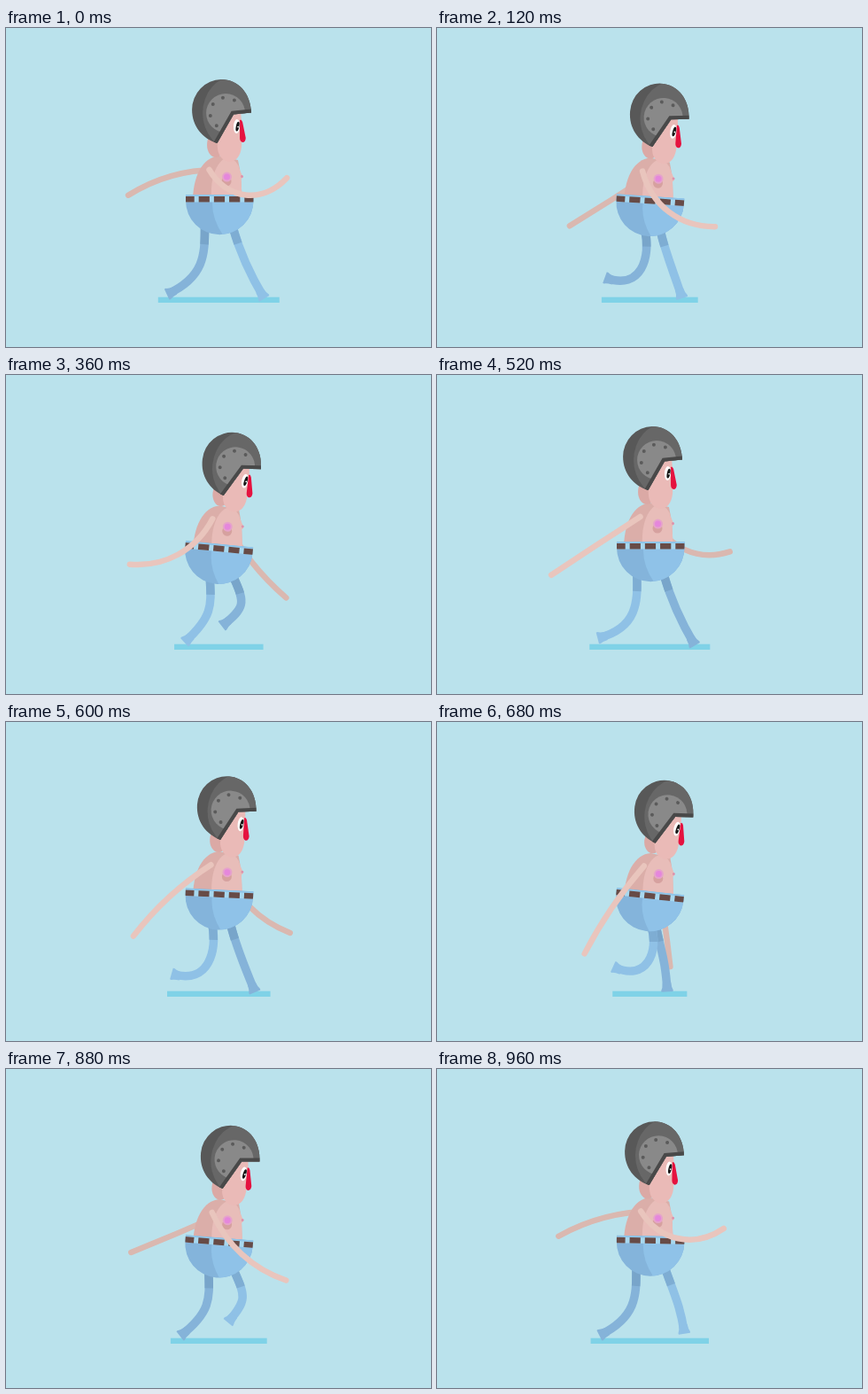
These frames come from a looping animation (480x360 px, 1 s). An HTML page with a canvas:

```html
<!DOCTYPE html>
<html lang="en">
<head>
<meta charset="utf-8">
<title>Walk cycle</title>
<style>
html, body { margin: 0; height: 100%; overflow: hidden; background: #bae2ec; }
canvas { display: block; }
</style>
</head>
<body>
<canvas id="stage" width="480" height="360"></canvas>
<script>
const c = document.getElementById('stage').getContext('2d');
const LOOP = 1000, STEP = 40, { sin, cos, PI } = Math;
const rad = deg => deg * PI / 180;

// Mean plus two harmonics of the walk angle
const wave = (a, mean, c1, s1, c2, s2) =>
  mean + c1 * cos(a) + s1 * sin(a) + c2 * cos(2 * a) + s2 * sin(2 * a);

// Point at a distance from p; 0 degrees hangs down, positive swings forward
const reach = ([x, y], length, deg) =>
  [x + length * sin(rad(deg)), y + length * cos(rad(deg))];

function fill(color, d) {
  c.fillStyle = color;
  c.fill(new Path2D(d));
}

function oval(color, x, y, rx, ry = rx, turn = 0) {
  c.fillStyle = color;
  c.beginPath();
  c.ellipse(x, y, rx, ry, turn, 0, 2 * PI);
  c.fill();
}

function rect(color, x, y, w, h) {
  c.fillStyle = color;
  c.fillRect(x, y, w, h);
}

function curve(color, width, from, p, q, to) {
  c.strokeStyle = color;
  c.lineWidth = width;
  c.beginPath();
  c.moveTo(...from);
  c.bezierCurveTo(...p, ...q, ...to);
  c.stroke();
}

// Run draw() moved by dx, dy and turned around px, py
function placed(dx, dy, deg, px, py, draw) {
  c.save();
  c.translate(px + dx, py + dy);
  c.rotate(rad(deg));
  c.translate(-px, -py);
  draw();
  c.restore();
}

function clipped(d, draw) {
  c.save();
  c.clip(new Path2D(d));
  draw();
  c.restore();
}

function arm(color, shoulder, length, swing, bend) {
  const p = reach(shoulder, length, swing);
  const q = reach(p, length, swing + bend / 2);
  c.lineCap = 'round';
  curve(color, 6.5, shoulder, p, q, reach(q, length, swing + bend));
}

// The foot slides back along the ground, then lifts and comes forward
function leg(color, shade, a, lean) {
  const k = cos(a), lift = Math.max(0, -sin(a));
  const hip = [240.5 + 16 * k + 9 * lift, 226 + 5 * lean];
  const foot = [237 + 54 * k - lift * (23 + 18 * k), 302 + 2 * k - 27 * lift];
  const shin = -17 + 48 * k - 85 * lift;
  const bones = [hip, reach(hip, 30, 8 + 8 * k + 15 * lift), reach(foot, 8 * k - 37, shin), foot];
  c.lineCap = 'butt';
  curve(color, 9.5, ...bones);
  c.setLineDash([18, 400]);
  curve(shade, 9.5, ...bones);
  c.setLineDash([]);
  placed(...foot, 90 - shin, 0, 0, () =>
    fill(color, 'M-9 -4.7Q-3 -5 0 -6.8L1.5 -6.5V6.5L0 6.8Q-3 5 -9 4.7Z'));
}

function torso() {
  fill('#dbaea9', 'M211 200C210 168 222 146 240 144.500L262 149Q267 170 266 200Z');
  fill('#e8bdb9', 'M233 200C229 172 237 150 250 146Q262 149 264 160L267 167Q268 169 265.500 171L267 200Z');
  oval('#d6a19f', 249, 173, 5.5);
  oval('#e6a3cb', 249.5, 168, 5.5);
  oval('#e587dc', 249.5, 168, 3.5);
  oval('#dd93ac', 266.5, 167.5, 1.5);
}

function pants() {
  clipped('M203 188H279.500V195A38.200 38.200 0 0 1 203 195Z', () => {
    rect('#84b4db', 200, 185, 84, 52);
    fill('#8fc2e8', 'M234 188Q229 215 250 240H290V188Z');
    rect('#8fc5e9', 200, 188, 84, 2);
    rect('#a8d8ef', 200, 190, 84, 6.5);
    for (let i = 0; i < 5; i++) rect('#674b47', 200.5 + i * 17.2, 190, 12.2, 6.5);
  });
}

function face() {
  oval('#dba9a5', 237, 132, 10, 14);
  fill('#eabab7', 'M239 128L254 94H265Q267 115 266 134Q264 151 251 151Q237 147 239 128Z');
}

function eyeAndNose() {
  oval('#fff', 260.5, 111, 3.6, 8, 0.05);
  oval('#161616', 261.5, 111, 1.8, 5.5, 0.2);
  oval('#fff', 262, 111.5, 0.9);
  fill('#e5123f', 'M264 104Q265.500 102 267 106L270.700 124Q270.500 129 267 129Q264 128 264 124Z');
}

function helmet() {
  clipped('M277 95.500L257 97.500L238.500 130C222 125 210 111 210 92A33.500 34 0 0 1 243 58C262 58 276 73 277 95.500Z', () => {
    rect('#585858', 205, 55, 75, 80);
    oval('#676767', 259, 96, 37, 42);
    oval('#898989', 248, 96, 22);
    for (let i = 0; i < 5; i++) {
      const a = rad(126 + 44.5 * i);
      oval('#5b5b5b', 248 + 17.5 * cos(a), 96 + 17.5 * sin(a), 2);
    }
    c.strokeStyle = '#494949';
    c.lineWidth = 8;
    c.stroke(new Path2D('M279 95.300L257 97.500L237 132.500'));
  });
}

function draw(t) {
  const a = t / LOOP * 2 * PI;
  // Lean: 0 with both feet apart, 1 when the legs pass
  const b = 2 * a - 0.126;
  const lean = (1 - cos(b)) / 2 + 0.06 * (1 - cos(2 * b));
  const half = 33 + 35.5 * Math.abs(cos(a)) ** 1.6;

  rect('#bae2ec', 0, 0, 480, 360);
  rect('#7fd2e7', 240.3 - half, 303.7, 2 * half, 6.3);
  arm('#dab8b0', [245 + 2 * lean, 160 + 4 * lean], 38,
    wave(a, -18, -58, 7, -16, 0), wave(a, 14, -26, 0, 46, 0));
  leg('#85b3d9', '#78a5ca', a + PI, lean);
  leg('#8fc1e6', '#7eadd3', a, lean);
  placed(0.5 * lean, 4 * lean, 1.5 * lean, 241, 190, torso);
  placed(-0.7 * lean, 3.5 * lean, 7.3 * lean, 241, 192, pants);
  placed(6 * lean, 4.5 * lean, 7.4 * lean, 252, 150, face);
  placed(6.3 * lean, 9.7 * lean, 8.8 * lean, 252, 150, () => {
    eyeAndNose();
    helmet();
  });
  arm('#e9c5bd', [229.5 + 5 * lean, 160 + 3 * lean], 40,
    wave(a, -12, 43, 5, 0, -8), wave(a, 18, 57, -20, 31, 28));
}

const start = performance.now();
function tick() {
  const t = (performance.now() - start) % LOOP;
  draw(Math.floor(t / STEP) * STEP);
  requestAnimationFrame(tick);
}
tick();
</script>
</body>
</html>
```
